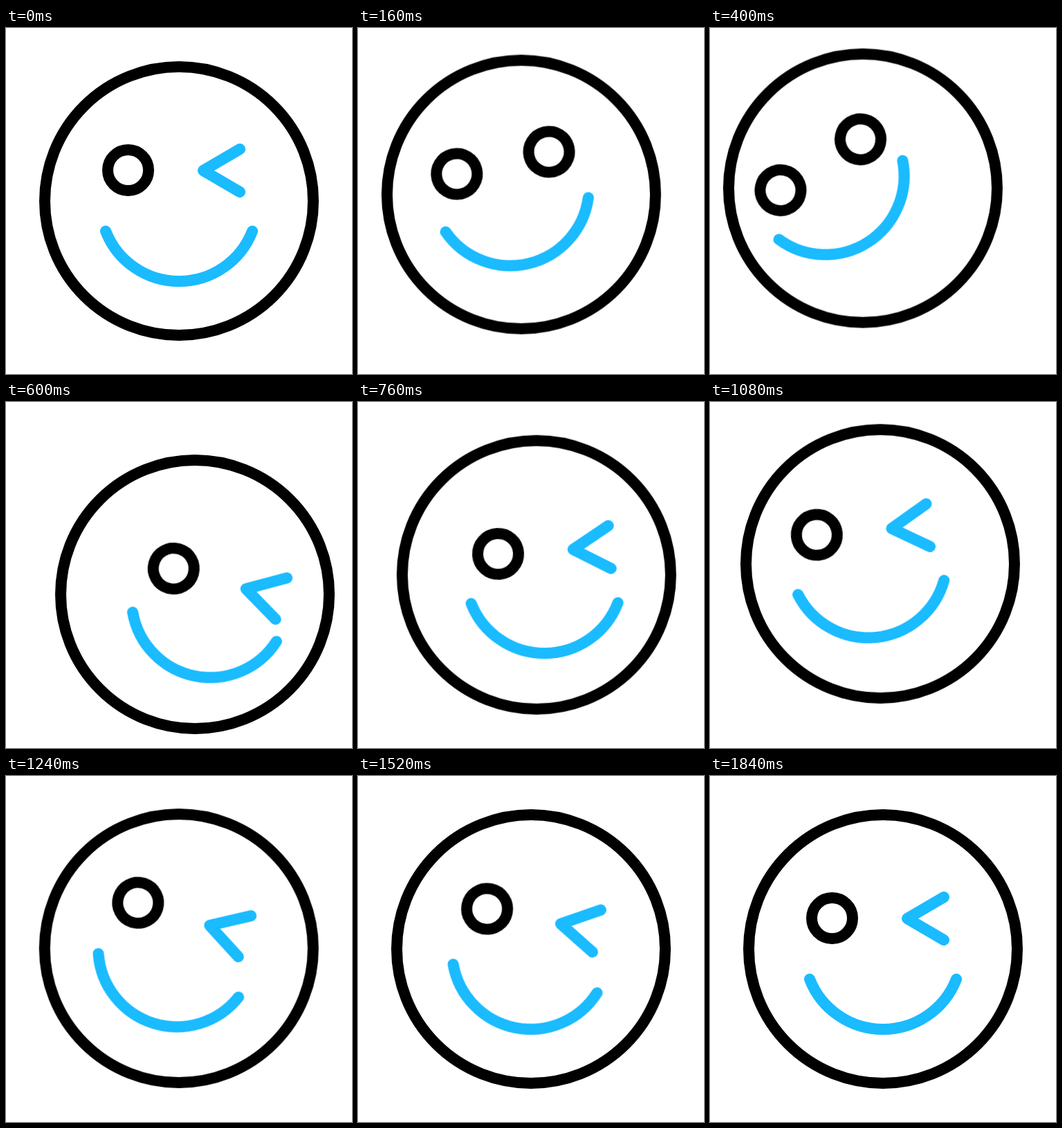
These frames come from a looping animation (500x500 px, 2 s). An HTML page:

```html
<!DOCTYPE html>
<html lang="en">
<head>
<meta charset="utf-8">
<title>Winking face</title>
<style>
html, body { margin: 0; width: 100%; height: 100%; overflow: hidden; background: #fff; }
svg { display: block; width: 100%; height: 100%; fill: none; stroke: #000; stroke-width: 16; stroke-linecap: round; stroke-linejoin: round; }
.blue { stroke: #1abbff; }

/* Head swings, the features tilt with it and trail slightly behind. */
.head, .eyes-tilt, .eyes-shift, .mouth-tilt, .mouth-shift {
  transform-origin: 0 0;
  animation: 2s cubic-bezier(.333, 0, .667, 1) infinite;
}
.head { animation-name: head; }
.eyes-tilt { animation-name: eyes-tilt; }
.eyes-shift { animation-name: eyes-shift; }
.mouth-tilt { animation-name: mouth-tilt; }
.mouth-shift { animation-name: mouth-shift; }
.open, .wink { animation: 2s step-end infinite; }
.open { animation-name: open; }
.wink { animation-name: wink; }

@keyframes head {
  0%, 64%, 100% { transform: translate(0, 0); }
  18% { transform: translate(-33.5px, -22.4px); }
  30% { transform: translate(23px, 28px); }
  46% { transform: translate(-7px, -28px); }
}
@keyframes eyes-tilt {
  0%, 92%, 100% { transform: rotate(0deg); }
  18% { transform: rotate(-32deg); }
  20% { transform: rotate(-32.5deg); }
  30% { transform: rotate(15.4deg); }
  46% { transform: rotate(-22.4deg); }
  64% { transform: rotate(18.6deg); }
}
@keyframes mouth-tilt {
  0%, 92%, 100% { transform: rotate(0deg); }
  18% { transform: rotate(-32deg); }
  20% { transform: rotate(-32.5deg); }
  32% { transform: rotate(14.8deg); }
  46% { transform: rotate(-23.1deg); }
  64% { transform: rotate(18.6deg); }
}
@keyframes eyes-shift {
  0%, 66%, 100% { transform: translate(0, 0); }
  20% { transform: translate(-28.4px, -16.9px); }
  32% { transform: translate(38.7px, 19.3px); }
  48% { transform: translate(-19px, -7.2px); }
}
@keyframes mouth-shift {
  0%, 66%, 100% { transform: translate(0, 0); }
  20% { transform: translate(-36.1px, -46.3px); }
  32% { transform: translate(27.5px, 3.1px); }
  48% { transform: translate(-22.4px, -14.6px); }
}
@keyframes open {
  0%, 25%, 100% { visibility: hidden; }
  4% { visibility: visible; }
}
@keyframes wink {
  0%, 25%, 100% { visibility: visible; }
  4% { visibility: hidden; }
}
</style>
</head>
<body>
<svg viewBox="0 0 500 500">
  <g transform="translate(250 250)">
    <g class="head">
      <circle r="194"/>
      <g class="eyes-tilt">
        <g class="eyes-shift">
          <circle cx="-73.5" cy="-44.5" r="29.5"/>
          <circle class="open" cx="63.5" cy="-44.5" r="29.5"/>
          <path class="wink blue" d="M88-75 35-44 88-13"/>
        </g>
      </g>
      <g class="mouth-tilt">
        <g class="mouth-shift">
          <path class="blue" d="M-106 43.5A113.7 113.7 0 0 0 106 43.5"/>
        </g>
      </g>
    </g>
  </g>
</svg>
</body>
</html>
```
